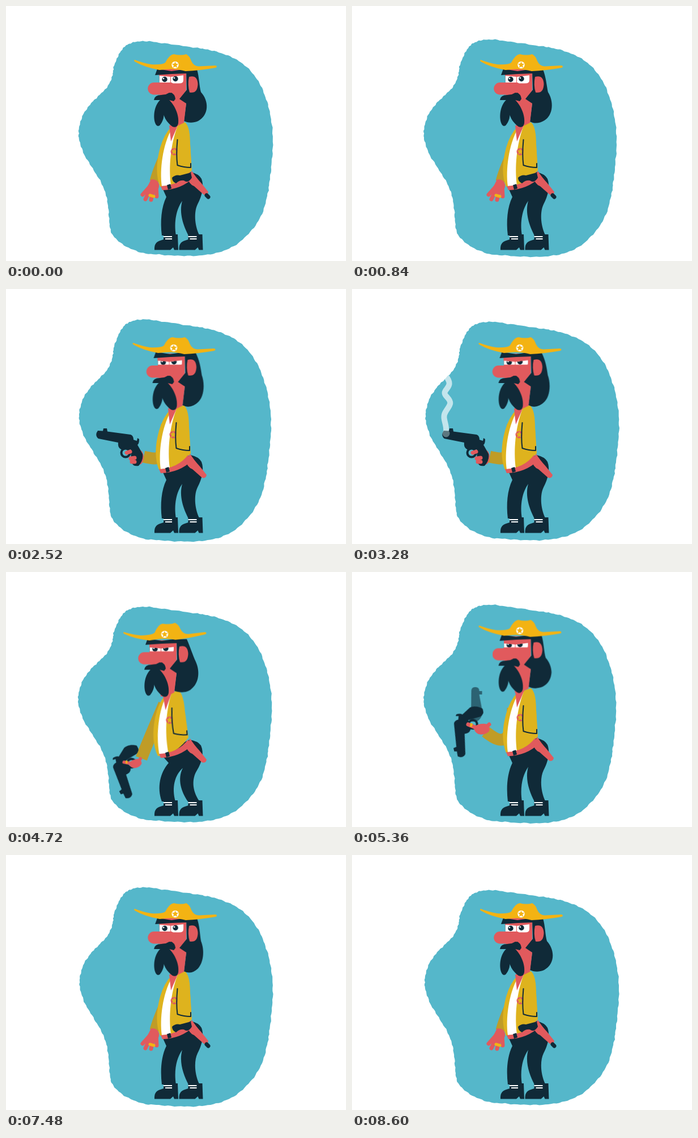
An HTML page that plays this animation: 600 px wide and 450 px high, repeating every 8.64 s.

```html
<!DOCTYPE html>
<html lang="en">
<head>
<meta charset="utf-8">
<title>Cowboy</title>
<style>
html, body { margin: 0; width: 100%; height: 100%; overflow: hidden; background: #fff; }
svg { display: block; width: 600px; height: 450px; }
.ink { fill: #102a38; }
.skin { fill: #e15a5d; }
.hat { fill: #f3b313; }
.coat { fill: #deb31e; }
.white { fill: #fff; }
.finger { fill: none; stroke: #e15a5d; stroke-width: 7; stroke-linecap: round; }
.anim { animation: 8640ms ease-in-out infinite; }
.snap { animation-timing-function: step-end; }

#head { animation-name: head; }
@keyframes head {
  0%, 20.83% { transform: translate(0, 0); }
  25%, 29.4% { transform: translate(-2.5px, 0); }
  30.6% { transform: translate(2px, -1px); }
  33%, 49.77% { transform: translate(-2.5px, 0); }
  54.17%, 56.48% { transform: translate(-17px, 6.5px); }
  60%, 66.67% { transform: translate(-2.5px, -.5px); }
  70%, 81% { transform: translate(1px, 0); }
  88%, 100% { transform: translate(0, 0); }
}
#hat { animation-name: hat; transform-origin: 298px 104px; }
@keyframes hat {
  0%, 49.77%, 60%, 100% { transform: translate(0, 0) rotate(0deg); }
  54.17%, 56.48% { transform: translate(-1.5px, -.5px) rotate(-4deg); }
}
#torso { animation-name: torso; transform-origin: 300px 318px; }
@keyframes torso {
  0%, 20.83% { transform: translate(0, 0) rotate(0deg); }
  25%, 49.77% { transform: translate(-2px, 0) rotate(0deg); }
  54.17%, 56.48% { transform: translate(-4px, 4px) rotate(-4deg); }
  60%, 100% { transform: translate(0, 0) rotate(0deg); }
}
#belt { animation-name: belt; }
@keyframes belt {
  0%, 20.83%, 68.98%, 100% { transform: translate(0, 0); }
  25%, 49.77% { transform: translate(-3px, 0); }
  54.17%, 56.48% { transform: translate(-3px, 3px); }
  60%, 66% { transform: translate(-1px, 0); }
}
#legs { animation-name: legs; }
@keyframes legs {
  0%, 49.77%, 60%, 100% { d: path("M274 317L283 337C274 355 272 380 275 405L300 405C296 380 301 358 311 344C305 365 313 388 322 405L341 404C332 385 332 362 338 350C346 335 350 318 345 305Q340 296 326 293Z"); }
  54.17%, 56.48% { d: path("M272 320L287 337C272 354 266 380 275 405L299 405C292 380 298 358 312 346C302 365 309 388 321 405L341 404C328 385 328 364 337 350C346 335 350 320 344 306Q338 298 324 296Z"); }
}
#hair { animation-name: hair; }
@keyframes hair {
  0%, 49.77%, 63%, 100% { d: path("M318 112L337 112C341 125 341 142 344 152C358 167 359 192 339 203C330 207 320 206 314 203L318 172L303 166L319 148Z"); }
  20%, 39% { d: path("M318 112L337 112C344 126 346 138 348 152C354 168 352 192 340 201C330 209 322 209 314 205L318 172L303 166L319 148Z"); }
  54.17%, 56.48% { d: path("M318 112L336 112C343 128 346 139 352 152C360 170 357 190 344 200C337 207 323 207 314 203L318 172L303 166L319 148Z"); }
  73%, 80% { d: path("M318 112L337 112C342 125 342 138 344 152C349 170 345 190 338 200C330 209 322 210 314 206L318 172L303 166L319 148Z"); }
}
#lid { animation-name: lid; }
@keyframes lid {
  0%, 20.83%, 88%, 100% { transform: translateY(0); }
  24%, 67% { transform: translateY(3.5px); }
  71%, 82% { transform: translateY(-1.5px); }
}
#cheek { animation-name: cheek; }
@keyframes cheek {
  0%, 20.83%, 71%, 100% { transform: translateY(0); }
  24%, 67% { transform: translateY(-3px); }
}
#sleeve { animation-name: sleeve; }
@keyframes sleeve {
  0%, 20.83%, 71.3%, 100% { d: path("M290 245C278 270 268 292 264 310"); }
  22.69%, 68.98% { d: path("M284 240C286 270 295 290 300 296"); }
  25%, 29.63% { d: path("M284 240C272 300 280 304 243 296"); }
  30.4% { d: path("M284 240C276 298 282 300 248 286"); }
  33%, 49.77% { d: path("M284 240C272 300 280 304 243 296"); }
  54.17%, 56.48% { d: path("M279 233C265 266 250 300 239 329"); }
  60%, 66.67% { d: path("M284 240C282 300 268 308 236 282"); }
}
#rest { animation-name: rest; }
@keyframes rest {
  0%, 20.83%, 71.3%, 100% { transform: translate(0, 0); }
  22.69%, 68.98% { transform: translate(42px, -16px); }
}
#held { animation-name: held; }
@keyframes held {
  0%, 22.69% { transform: translate(300px, 296px); }
  25%, 29.63% { transform: translate(212px, 288px); }
  30.4% { transform: translate(218px, 278px); }
  33%, 49.77% { transform: translate(212px, 288px); }
  54.17%, 56.48% { transform: translate(220px, 337px); }
  60%, 66.67% { transform: translate(212px, 268px); }
  68.98%, 100% { transform: translate(300px, 296px); }
}
#spin { animation-name: spin; animation-timing-function: linear; }
@keyframes spin {
  0%, 22.69% { transform: rotate(-120deg); }
  25%, 29.63% { transform: rotate(0deg); }
  30.4% { transform: rotate(14deg); }
  33%, 49.77% { transform: rotate(0deg); }
  54.17%, 56.48% { transform: rotate(-119deg); }
  62.04% { transform: rotate(256deg); }
  66.67% { transform: rotate(560deg); }
  68.98%, 100% { transform: rotate(600deg); }
}
#palm { animation-name: palm; }
@keyframes palm {
  0%, 56.48% { transform: translate(-8px, -3px) rotate(-12deg) scale(.8); }
  60%, 100% { transform: translate(-2px, 0) rotate(0deg) scale(1); }
}
.away { animation-name: away; }
@keyframes away { 0%, 68.98%, 100% { opacity: 1; } 22.69% { opacity: 0; } }
.drawn { animation-name: drawn; }
@keyframes drawn { 0%, 68.98%, 100% { opacity: 0; } 22.69% { opacity: 1; } }
.grip { animation-name: grip; }
@keyframes grip { 0%, 51.4%, 100% { opacity: 0; } 22.69% { opacity: 1; } }
.loose { animation-name: loose; }
@keyframes loose { 0%, 68.98%, 100% { opacity: 0; } 51.4% { opacity: 1; } }
.ghost { animation-name: ghost; }
@keyframes ghost { 0%, 66.2%, 100% { opacity: 0; } 57.4% { opacity: .6; } }
#flash { animation-name: flash; }
@keyframes flash { 0%, 31.7%, 100% { opacity: 0; } 29.63% { opacity: 1; } }
#smoke { animation-name: smoke; stroke-dasharray: 1 2; }
@keyframes smoke {
  0%, 32% { d: path("M168 252C174 238 156 232 164 217C170 205 182 200 170 189C152 174 182 180 168 146"); stroke-dashoffset: 1; opacity: .65; }
  37.96% { d: path("M166 252C168 238 158 228 165 217C172 205 178 202 168 191C152 176 186 176 164 152"); stroke-dashoffset: 0; opacity: .65; }
  43% { d: path("M167 252C160 238 172 230 166 217C158 205 158 202 167 189C182 174 156 174 168 146"); stroke-dashoffset: 0; opacity: .55; }
  47.5%, 100% { d: path("M167 252C174 238 156 230 164 217C172 205 178 202 167 189C150 174 182 174 166 146"); stroke-dashoffset: 0; opacity: 0; }
}
#puff { animation-name: puff; }
@keyframes puff {
  0%, 31.7%, 47%, 100% { opacity: 0; }
  33%, 42% { opacity: .45; }
}
</style>
</head>
<body>
<svg viewBox="0 0 600 450">
  <defs>
    <path id="star" d="M0-6L1.6-2.2 5.7-1.9 2.6.8 3.5 4.9 0 2.7-3.5 4.9-2.6.8-5.7-1.9-1.6-2.2Z"/>
    <g id="boot">
      <path class="ink" d="M278 403H303L304 430.5H297L295 426 290 430.5H262Q261 417 272 414L278 412Z"/>
      <path d="M278 407H293M281 411H293" stroke="#fff" stroke-width="2"/>
    </g>
    <g id="gun" class="ink">
      <path d="M-50-38L-41-37.500-40-42H-34L-33-36.500 8-31Q13-29 13-22L19-20 20-25 23-23Q23-15 20-13L29 3Q31 14 22 24 12 26 9 17L8-5H-9Q-15-8-14-17L-49-24Q-56-30-50-38Z"/>
      <circle cx="-1" cy="1" r="7.500" fill="none" stroke="#102a38" stroke-width="4"/>
    </g>
  </defs>

  <path id="blob" fill="#55b7ca"/>

  <path id="smoke" class="anim" pathLength="1" fill="none" stroke="#fff" stroke-width="10" stroke-linejoin="round"/>
  <path id="sleeve" class="anim" fill="none" stroke="#bf9c27" stroke-width="21"/>

  <g id="rest" class="anim">
    <g class="anim snap away">
      <path class="skin" d="M256 306Q268 305 270 315 271 325 262 327 252 329 248 322Z"/>
      <path class="finger" d="M256 316L241 333M257 318L246 341M261 319L256 342M265 317L266 336"/>
      <path d="M254 334L261 336" stroke="#f3b313" stroke-width="5" stroke-linecap="round"/>
    </g>
  </g>

  <g id="held" class="anim">
    <ellipse class="skin anim snap grip" cx="23" cy="9" rx="8" ry="13"/>
    <g class="anim snap drawn">
      <g id="spin" class="anim">
        <g class="anim snap ghost">
          <g class="ink" transform="rotate(104)">
            <path d="M-2-58Q-2-65 5-65 12-65 12-58H17V-52H12L18-22Q18-10 8-4H-2Z"/>
            <ellipse cx="5" cy="-60" rx="5" ry="4"/>
          </g>
        </g>
        <use href="#gun"/>
      </g>
    </g>
    <g class="anim snap grip">
      <path class="finger" d="M1 1L7-1M8 11L15 10M10 17L15 17"/>
    </g>
    <g class="anim snap loose">
      <g id="palm" class="anim">
        <path class="skin" d="M5 5Q14-1 26 0 35 4 32 13 24 21 13 18 5 14 5 5Z"/>
        <path class="finger" d="M-5 1L12 8M23 9L32 1"/>
        <path d="M1-1L0 5" stroke="#f3b313" stroke-width="4"/>
      </g>
    </g>
  </g>
  <circle id="puff" class="anim" cx="166" cy="255" r="6.500" fill="#bdd6d8"/>
  <g id="flash" class="anim snap">
    <path class="hat" d="M158 257L124 236 128 249 50 244 106 256 62 272 126 265 122 279Z"/>
    <path class="white" d="M156 257L128 249 94 256 128 262Z"/>
  </g>

  <path id="legs" class="ink anim"/>
  <use href="#boot"/>
  <use href="#boot" x="43.500"/>

  <g id="torso" class="anim">
    <path class="coat" d="M292 213L316 205Q323 212 324 228L328 290Q310 311 289 318L272 319C264 300 265 275 272 250Q279 226 292 213Z"/>
    <path class="white" d="M293 216L303 211C290 245 287 285 291 316L275 318C271 290 276 245 293 216Z"/>
    <path class="skin" d="M288 211L304 209 291 239Z"/>
    <circle class="skin" cx="297" cy="257" r="6.500"/>
    <use href="#star" class="coat" x="297" y="257"/>
    <path class="coat" d="M303 225L324 225 327 285 302 281Z"/>
    <path d="M302.500 236C301 252 301 270 302.500 281Q314 285 326 285L326 278" fill="none" stroke="#102a38" stroke-width="2" stroke-linecap="round" stroke-linejoin="round"/>
  </g>

  <g id="belt" class="anim">
    <path class="skin" d="M273 318Q307 316 324 293L331 303Q309 324 276 325Z"/>
    <path class="ink" d="M284 316L290 314 292 322 286 324Z"/>
    <path class="skin" d="M321 303L328 291Q334 301 345 313L357 328Q356 335 349 333L332 318Q322 314 321 303Z"/>
    <g class="anim snap away">
      <path class="ink" d="M293 303Q299 297 307 299L326 294 328 303Q321 314 314 308 306 307 300 313 293 310 293 303Z"/>
      <path d="M354 334L357 337" stroke="#102a38" stroke-width="7" stroke-linecap="round"/>
    </g>
  </g>

  <g id="head" class="anim">
    <path id="hair" class="ink anim"/>
    <path class="skin" d="M270 114H318V149L306 164 318 172 314 206 300 213 290 213 288 165 272 158Z"/>
    <path class="skin" d="M323 125Q338 121 338.500 138 338 155 324 152.500 320 139 323 125Z"/>
    <path class="white" d="M271 122H290V136H271ZM291 122H313V131Q313 137 304 137H291Z"/>
    <g class="ink"><circle cx="280" cy="129.500" r="4.700"/><circle cx="299" cy="128.500" r="4.700"/></g>
    <g class="white"><circle cx="278" cy="128" r="1.300"/><circle cx="297" cy="127" r="1.300"/></g>
    <path id="lid" class="skin anim" d="M270 111H315V122L291 125 270 123Z"/>
    <path id="cheek" class="skin anim" d="M270 136.500H315V146H270Z"/>
    <path class="ink" d="M267 111L292 115 319 111V119L292 120 263 122Z"/>
    <path class="ink" d="M261 166Q262 157 274 157L290 152Q298 155 299 164L296 168 288 166C297 174 306 192 304 207Q302 216 294 213C284 206 276 194 277 180C281 194 277 204 271 211Q266 214 263 206C259 192 263 174 272 166Z"/>
    <path class="skin" d="M261 135H292Q300 138 298 148 296 154 288 153 282 157 276 156.500H261A10.700 10.700 0 0 1 261 135Z"/>
    <g id="hat" class="anim">
      <path class="hat" d="M227 95Q240 100 256 103 275 104 281 100 288 86 296 85 309 88 318 85 324 88 327 97 331 106 340 106.500L370 105Q374 107 370 109 341 114 317 115 296 109 271 113 244 108 227 98 225 96 227 95Z"/>
      <circle class="white" cx="298.500" cy="104" r="6.200"/>
      <use href="#star" class="hat" x="298.500" y="104"/>
    </g>
  </g>
</svg>
<script>
const outline = [
  [222,65],[245,62],[280,66],[330,73],[356,77],[388,86],[418,102],[443,129],[458,161],[467,195],
  [471,235],[469,275],[465,310],[461,335],[450,371],[428,402],[398,426],[361,438],[320,441],[275,439],
  [238,435],[205,420],[186,400],[182,375],[179,345],[171,318],[155,290],[138,262],[129,235],[129,215],
  [136,192],[150,172],[165,157],[180,141],[188,122],[190,108],[198,88],[208,73]
];
const steps = 8, total = outline.length * steps, turn = Math.PI * 2;
const blob = document.getElementById('blob');
const weight = (v, from, span) => Math.max(0, (v - from) / span);

function shifted([x, y], a) {
  const swell = (1 - Math.cos(a)) / 2;
  const right = -2.4 - 3.5 * Math.cos(a - 2.32);
  return [
    x + right * weight(x, 350, 120) - 1.6 * Math.sin(a) * weight(-x, -200, 70),
    y - 9 * swell * weight(-y, -150, 88) + 5 * swell * weight(y, 350, 90)
  ];
}

// Catmull-Rom value and slope on one axis
function curve(p0, p1, p2, p3, u) {
  const b = p2 - p0, c = 2 * p0 - 5 * p1 + 4 * p2 - p3, d = 3 * p1 - p0 - 3 * p2 + p3;
  return [p1 + (b * u + c * u * u + d * u * u * u) / 2, b + 2 * c * u + 3 * d * u * u];
}

function drawBlob(ms) {
  const a = ms / 4320 * turn;
  const pts = outline.map(p => shifted(p, a)), n = pts.length;
  let d = '';
  for (let i = 0; i < total; i++) {
    const k = Math.floor(i / steps), u = i % steps / steps;
    const near = [n - 1, 0, 1, 2].map(j => pts[(k + j) % n]);
    const [x, dx] = curve(...near.map(p => p[0]), u);
    const [y, dy] = curve(...near.map(p => p[1]), u);
    const s = i / total * turn, len = Math.hypot(dx, dy);
    const rough = .5 * Math.sin(97 * s) + .3 * Math.sin(61 * s + a) + .2 * Math.sin(37 * s);
    d += (i ? 'L' : 'M') + (x + dy / len * rough).toFixed(2) + ' ' + (y - dx / len * rough).toFixed(2);
  }
  blob.setAttribute('d', d + 'Z');
}

function frame() {
  drawBlob(performance.now() % 8640);
  requestAnimationFrame(frame);
}
frame();
</script>
</body>
</html>
```
